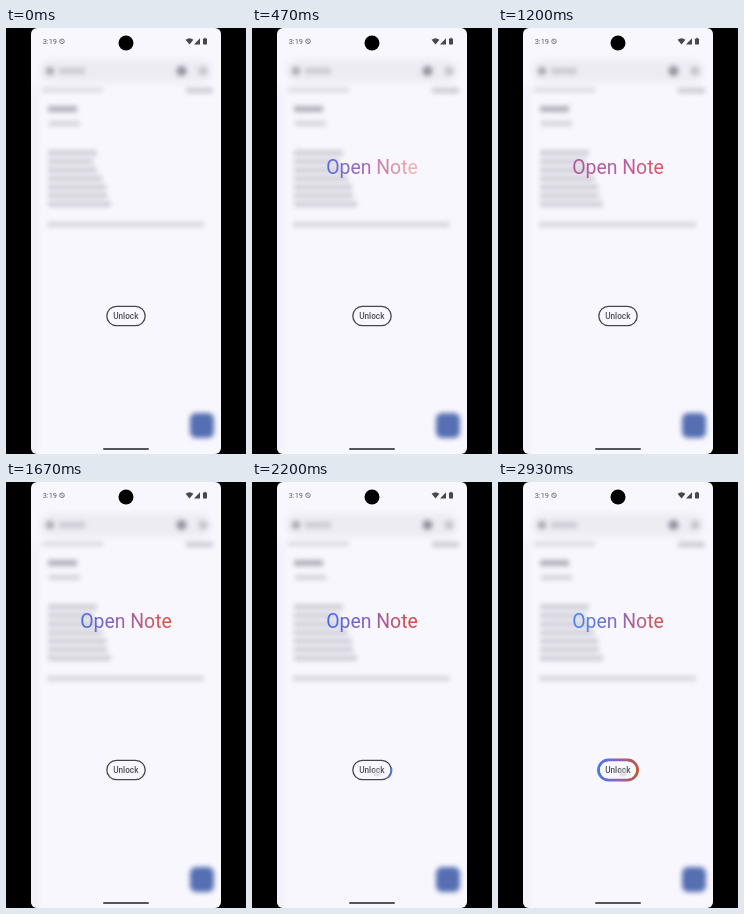
Animation, 240 px wide and 426 px high, one loop 2.99 s. Source, as an HTML page with a canvas:

```html
<!DOCTYPE html>
<html lang="en">
<head>
<meta charset="utf-8">
<title>Unlock screen</title>
<style>
html, body { margin: 0; width: 100%; height: 100%; overflow: hidden; background: #000; }
canvas { display: block; width: 240px; height: 426px; }
</style>
</head>
<body>
<canvas id="stage"></canvas>
<script>
const W = 240, H = 426, LOOP = 2990, STEPS = 45;
const TAU = Math.PI * 2;
const FONT = 'Roboto, "Noto Sans", sans-serif';
const TITLE = 'Open Note';
const scale = window.devicePixelRatio || 1;

// Title gradient: time, then left, middle and right colours
const SHADES = [
  [0, [84, 112, 222], [166, 108, 190], [222, 120, 122]],
  [470, [84, 108, 216], [176, 106, 180], [222, 112, 108]],
  [1200, [176, 88, 150], [176, 96, 172], [216, 88, 106]],
  [1670, [70, 110, 232], [160, 98, 176], [214, 84, 76]],
  [2200, [64, 108, 236], [144, 98, 190], [212, 76, 78]],
  [2600, [62, 122, 242], [148, 104, 190], [212, 86, 76]],
  [2930, [56, 138, 246], [136, 108, 200], [206, 88, 90]]
];

const clamp = v => Math.max(0, Math.min(1, v));
const ease = v => { v = clamp(v); return v * v * (3 - 2 * v); };
const mix = (a, b, k) => a.map((v, i) => v + (b[i] - v) * k);
const rgb = c => `rgb(${c.map(Math.round).join(',')})`;

function prepare(canvas) {
  canvas.width = W * scale;
  canvas.height = H * scale;
  const g = canvas.getContext('2d');
  g.scale(scale, scale);
  return g;
}

function pill(g, x, y, w, h, r) {
  g.beginPath();
  g.roundRect(x, y, w, h, r);
}

function dot(g, x, y, r) {
  g.beginPath();
  g.arc(x, y, r, 0, TAU);
}

function drawStatus(g) {
  g.fillStyle = '#5c5b62';
  g.font = `7.4px ${FONT}`;
  g.textBaseline = 'alphabetic';
  g.textAlign = 'left';
  g.fillText('3:19', 36.7, 16);
  g.strokeStyle = '#66656c';
  g.lineWidth = 0.8;
  dot(g, 56, 13.3, 2.3);
  g.stroke();
  g.beginPath();
  g.moveTo(54.6, 11.9);
  g.lineTo(57.4, 14.7);
  g.stroke();

  g.fillStyle = '#48474e';
  g.beginPath();
  g.moveTo(183.5, 16.6);
  g.lineTo(179.6, 11.8);
  g.quadraticCurveTo(183.5, 8.8, 187.4, 11.8);
  g.fill();
  g.beginPath();
  g.moveTo(188, 16.4);
  g.lineTo(194, 16.4);
  g.lineTo(194, 10.2);
  g.fill();
  pill(g, 197, 10.6, 4, 6, 0.7);
  g.fill();
  g.fillRect(198.2, 9.8, 1.6, 1);
  g.fillStyle = '#000';
  dot(g, 120, 15, 7.5);
  g.fill();
}

function drawBlurred(g) {
  const bar = (x, y, w, h, tone) => {
    g.fillStyle = tone;
    g.fillRect(x, y, w, h);
  };
  g.filter = `blur(${3 * scale}px)`;
  g.fillStyle = '#eeecf3';
  pill(g, 34, 31, 172, 24, 12);
  g.fill();
  bar(25, 58, 7, 368, '#f1eff8');
  g.filter = `blur(${2.7 * scale}px)`;
  g.fillStyle = '#a3a1aa';
  dot(g, 44, 43, 4);
  g.fill();
  bar(53, 40, 26, 6, '#cac8d1');
  g.fillStyle = '#8f8f9c';
  dot(g, 175.5, 43, 5);
  g.fill();
  g.fillStyle = '#c3c1cc';
  dot(g, 197, 43, 4.5);
  g.fill();
  bar(36, 60, 61, 4, '#d6d4dd');
  bar(180, 60, 27, 5, '#c8c6d0');
  bar(42, 78, 29, 6, '#b0aeb8');
  bar(43, 93, 31, 5, '#d2d0d9');
  [49, 45, 49, 54, 58, 59, 63].forEach((w, i) =>
    bar(42, 122 + i * 8.5, w, 6, '#d0ced8'));
  bar(41, 194, 157, 5, '#d5d3dc');
  g.fillStyle = '#566fb2';
  pill(g, 184, 385, 24, 25, 6);
  g.fill();
  g.filter = 'none';
}

function makeBackdrop() {
  const layer = document.createElement('canvas');
  const g = prepare(layer);
  g.fillStyle = '#000';
  g.fillRect(0, 0, W, H);
  pill(g, 25, 0, 190, 426, 6);
  g.clip();
  g.fillStyle = '#f9f7fe';
  g.fillRect(25, 0, 190, 426);
  drawBlurred(g);
  drawStatus(g);
  g.fillStyle = '#55545a';
  pill(g, 97, 420, 46, 2, 1);
  g.fill();
  return layer;
}

function shadesAt(t) {
  let i = 0;
  while (i < SHADES.length - 2 && t >= SHADES[i + 1][0]) i++;
  const a = SHADES[i], b = SHADES[i + 1];
  const k = ease((t - a[0]) / (b[0] - a[0]));
  return [1, 2, 3].map(n => rgb(mix(a[n], b[n], k)));
}

function drawTitle(g, t) {
  g.font = `19.4px ${FONT}`;
  g.textAlign = 'left';
  g.textBaseline = 'alphabetic';
  const left = 120 - g.measureText(TITLE).width / 2;
  const fill = g.createLinearGradient(75, 0, 165, 0);
  shadesAt(t).forEach((c, i) => fill.addColorStop([0, 0.48, 0.9][i], c));
  g.fillStyle = fill;
  if (t > 700) {
    g.fillText(TITLE, left, 145.8);
    return;
  }
  [...TITLE].forEach((ch, i) => {
    g.globalAlpha = clamp((t - 70 - i * 30) / 300);
    g.fillText(ch, left + g.measureText(TITLE.slice(0, i)).width, 145.8);
  });
  g.globalAlpha = 1;
}

function drawGlow(g, t) {
  const grow = ease((t - 2130) / 340);
  const turn = Math.PI * ease((t - 2200) / 400);
  const warm = mix([208, 78, 84], [198, 84, 42], clamp((t - 2600) / 330));
  const ring = g.createConicGradient(turn, 120, 288);
  const blue = 'rgb(62,124,238)', violet = 'rgb(146,98,186)';
  [blue, violet, rgb(warm), violet, blue].forEach((c, i) =>
    ring.addColorStop(i / 4, c));
  g.save();
  dot(g, 141, 292, 3 + 46 * grow);
  g.clip();
  g.strokeStyle = ring;
  g.lineWidth = 1.5 + 1.2 * grow;
  pill(g, 100.4, 277.9, 39.2, 20.2, 10.1);
  g.stroke();
  g.restore();
}

function drawButton(g, t) {
  const pressed = t > 2150;
  g.strokeStyle = '#48474d';
  g.lineWidth = 1.3;
  pill(g, 100.8, 278.3, 38.4, 19.4, 9.7);
  g.stroke();
  if (pressed) drawGlow(g, t);
  g.fillStyle = '#504f55';
  g.font = `500 8.2px ${FONT}`;
  g.textAlign = 'center';
  g.textBaseline = 'alphabetic';
  g.fillText('Unlock', 119.8, 291);
  if (pressed) {
    g.fillStyle = 'rgba(205,205,214,0.55)';
    dot(g, 125, 290.5, 4);
    g.fill();
  }
}

const ctx = prepare(document.getElementById('stage'));
const backdrop = makeBackdrop();
const start = performance.now();

function frame() {
  const now = (performance.now() - start) % LOOP;
  const t = Math.floor(now * STEPS / LOOP) * LOOP / STEPS;
  ctx.drawImage(backdrop, 0, 0, W, H);
  drawTitle(ctx, t);
  drawButton(ctx, t);
  requestAnimationFrame(frame);
}
frame();
</script>
</body>
</html>
```
